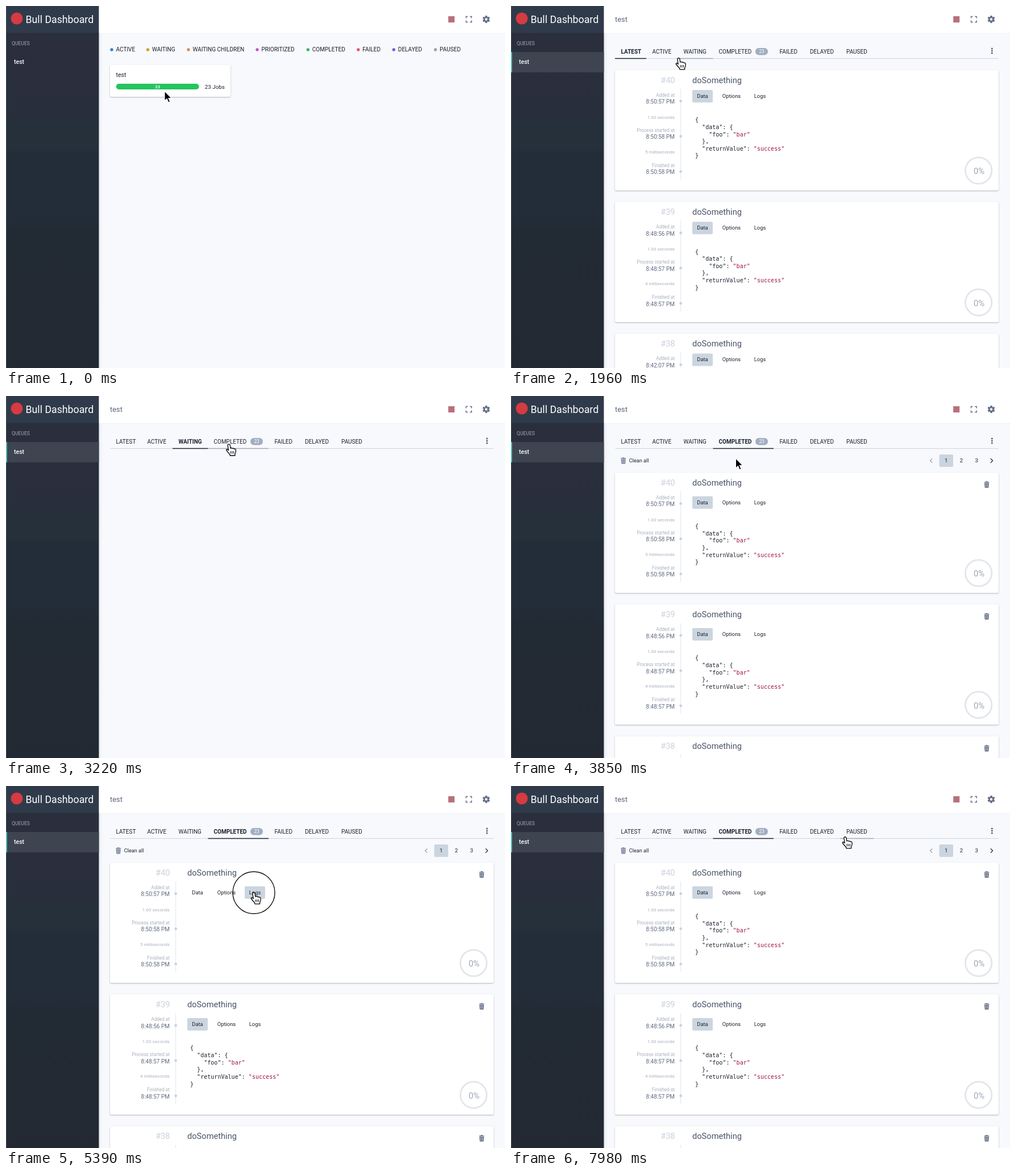
Animation, 878 px wide and 638 px high, one loop 8000 ms. Source, as an HTML page:

```html
<!DOCTYPE html>
<html lang="en">
<head>
<meta charset="utf-8">
<title>Queue dashboard</title>
<style>
  html, body { margin: 0; width: 100%; height: 100%; overflow: hidden; background: #f8f9fd; }
  svg { display: block; width: 878px; height: 638px; }
  text { font-family: Roboto, "Open Sans", sans-serif; fill: #1a202c; }
  .code { font-family: "DejaVu Sans Mono", monospace; font-size: 10.05px; }
  .card { fill: #fff; filter: drop-shadow(0 1px 1px rgba(0, 0, 0, .28)); }
  .hidden { display: none; }
</style>
</head>
<body>
<svg id="stage" viewBox="0 0 878 638" xmlns="http://www.w3.org/2000/svg"></svg>
<script>
const LOOP = 8000, STEP = 70;
const PILL = '#cbd5e0', MUTED = '#a9b0be', ICON = '#667188', CHAR = 6.05;

const text = (x, y, size, str, attrs = '') =>
  `<text x="${x}" y="${y}" font-size="${size}" ${attrs}>${str}</text>`;
const rect = (x, y, w, h, fill, attrs = '') =>
  `<rect x="${x}" y="${y}" width="${w}" height="${h}" fill="${fill}" ${attrs}/>`;
const dot = (x, y, r, fill) => `<circle cx="${x}" cy="${y}" r="${r}" fill="${fill}"/>`;
const line = (d, color, width = 1) =>
  `<path d="${d}" fill="none" stroke="${color}" stroke-width="${width}"/>`;
const group = (id, body, attrs = '') => `<g id="${id}" ${attrs}>${body}</g>`;

// label, left edge, right edge, text position
const TABS = [
  ['LATEST', 183, 238, 193.5], ['ACTIVE', 238, 293, 248.5], ['WAITING', 293, 355.5, 303.5],
  ['COMPLETED', 355.5, 462, 365.5], ['FAILED', 462, 515.5, 472.5],
  ['DELAYED', 515.5, 579.5, 526], ['PAUSED', 579.5, 638, 590]
];
const BUTTONS = [['Data', 319, 36], ['Options', 363, 50], ['Logs', 420, 36]];
const LEGEND = [
  ['ACTIVE', 186, '#3182ce'], ['WAITING', 249.5, '#d69e2e'], ['WAITING CHILDREN', 321, '#dd8d55'],
  ['PRIORITIZED', 442, '#c453d2'], ['COMPLETED', 531.3, '#38b56f'], ['FAILED', 619.8, '#e25b6c'],
  ['DELAYED', 682.3, '#805ad5'], ['PAUSED', 755.6, '#a0a0a0']
];
const JOBS = [
  [40, '8:50:57 PM', '8:50:58 PM', 5],
  [39, '8:48:56 PM', '8:48:57 PM', 4],
  [38, '8:42:07 PM', '8:42:08 PM', 4]
];
// indent, key part, string part
const DATA = [[0, '{'], [2, '"data": {'], [4, '"foo": ', '"bar"'], [2, '},'],
  [2, '"returnValue": ', '"success"'], [0, '}']];
const OPTIONS = [[0, '{'], [2, '"attempts": 0,'], [2, '"delay": 1000'], [0, '}']];

function code(lines, top) {
  return lines.map(([indent, key, value], i) => {
    const x = 324 + indent * CHAR, y = top + i * 12.65;
    return text(x, y, 10.05, key, 'class="code"') + (value
      ? text(x + key.length * CHAR, y, 10.05, value, 'class="code" style="fill:#a1113f"') : '');
  }).join('');
}

function trash(x, y, color) {
  return line(`M${x - 4.5} ${y - 4}h9M${x - 1.7} ${y - 5.2}h3.4`, color, 1.3) +
    `<path d="M${x - 4} ${y - 2.6}h8l-.7 8.2h-6.6z" fill="${color}"/>` +
    line(`M${x - 1.4} ${y - 1.2}v5.3M${x + 1.4} ${y - 1.2}v5.3`, '#fff', .7);
}

function timeline(top, [, added, started, ms]) {
  const right = (y, size, str, color) =>
    text(288, top + y, size, str, `text-anchor="end" style="fill:${color}"`);
  const entry = (y, label, time) =>
    right(y, 8.2, label, MUTED) + right(y + 12.8, 10, time, '#606b80') + dot(298.7, top + y + 8.2, 2.4, '#cdd2db');
  return line(`M298.7 ${top + 33}v160`, '#e1e5eb') +
    entry(46.5, 'Added at', added) + right(85.5, 8.1, '1.00 seconds', MUTED) +
    entry(108.5, 'Process started at', started) + right(147, 8.1, ms + ' milliseconds', MUTED) +
    entry(170.5, 'Finished at', started);
}

// Finished jobs have a delete icon, which makes the row of buttons sit lower.
function card(job, i, top, finished) {
  const y = top + i * 232.3, shift = finished ? 6.8 : 0, live = finished && i === 0;
  const buttons = BUTTONS.map(([label, x, w], k) =>
    rect(x, y + 35 + shift, w, 22, PILL, `rx="2" ${live ? `id="button${k}"` : ''} class="${k ? 'hidden' : ''}"`) +
    text(x + w / 2, y + 48.8 + shift, 9.4, label, 'text-anchor="middle"')).join('');
  const codeTop = y + 91.2 + shift;
  return rect(183, y, 675, 212, '#fff', 'rx="2.5" class="card"') +
    text(288.5, y + 22.5, 14.5, '#' + job[0], 'text-anchor="end" style="fill:#cbd1db"') +
    text(319, y + 22.5, 14.65, 'doSomething', 'style="fill:#4a5568"') +
    timeline(y, job) + buttons +
    (live ? group('panel0', code(DATA, codeTop)) + group('panel1', code(OPTIONS, codeTop)) : code(DATA, codeTop)) +
    `<circle cx="822.7" cy="${y + 177}" r="23.2" fill="none" stroke="#e3e5eb" stroke-width="2.8"/>` +
    text(823.5, y + 183.2, 14.8, '0%', 'text-anchor="middle" style="fill:#9aa4b6"') +
    (finished ? trash(837, y + 21.2, ICON) : '');
}

const cards = (top, finished) => JOBS.map((job, i) => card(job, i, top, finished)).join('');

function sidebar() {
  return `<linearGradient id="side" x2="0" y2="1">
      <stop offset="0" stop-color="#2a2e3d"/><stop offset=".25" stop-color="#292e3d"/>
      <stop offset=".27" stop-color="#25303a"/><stop offset=".34" stop-color="#25303a"/>
      <stop offset=".36" stop-color="#232d3a"/><stop offset=".54" stop-color="#232d39"/>
      <stop offset=".6" stop-color="#222a34"/><stop offset="1" stop-color="#222933"/>
    </linearGradient>
    <linearGradient id="edge"><stop stop-color="#dcdfe5"/><stop offset=".35" stop-color="#eff1f5"/>
      <stop offset="1" stop-color="#f8f9fd"/></linearGradient>` +
    rect(163, 49, 7, 589, 'url(#edge)') + rect(0, 48, 163.4, 590, 'url(#side)') +
    rect(0, 0, 163.4, 48, '#2f3b4a') + rect(0, 47.5, 163.4, 1, '#28313e') +
    rect(0, 0, 1, 638, '#47505c') +
    group('item', rect(0, 81, 163.4, 36, '#3e4450') + rect(0, 81, 1.8, 36, '#4fd1c5')) +
    dot(19, 22, 10.5, '#d63a42') +
    text(34.5, 29.8, 17.75, 'Bull Dashboard', 'style="fill:#fff"') +
    text(10, 68.6, 8.6, 'QUEUES', 'style="fill:#a5abb5"') +
    text(14, 102.3, 10.5, 'test', 'font-weight="500" style="fill:#f7f9fb"');
}

function header() {
  const teeth = Array.from({ length: 6 }, (_, i) =>
    rect(843.2, 16.9, 3.6, 4, ICON, `rx=".7" transform="rotate(${i * 60} 845 23.5)"`)).join('');
  return rect(163, 0, 715, 48, '#fff') + rect(163, 48, 715, 1, '#edf0f4') +
    rect(778.2, 18, 11, 11, '#b8717b') +
    line('M809.5 21.6v-3h3M816.2 18.6h3v3M819.2 25.4v3h-3M812.5 28.4h-3v-3', ICON, 1.5) +
    teeth + `<circle cx="845" cy="23.5" r="3.5" fill="#fff" stroke="${ICON}" stroke-width="2.7"/>`;
}

function overview() {
  return LEGEND.map(([label, x, color]) => dot(x, 77, 2.7, color) + text(x + 7.5, 80, 10.05, label)).join('') +
    rect(183, 104, 212, 56, '#fff', 'rx="2.5" class="card"') +
    text(193.5, 125, 10.6, 'test') +
    rect(193.7, 137, 146, 10, '#22c55e', 'rx="5"') +
    text(266.7, 144.7, 8, '23', 'text-anchor="middle" font-weight="500" style="fill:#fff"') +
    text(349.7, 145.5, 9.9, '23 Jobs');
}

function queue() {
  return text(183, 27.5, 12.9, 'test', 'style="fill:#5a667c"') +
    line('M183.5 92.5H858', '#cfd4dc') +
    TABS.map(([label, left, right, x], i) =>
      text(x, 83.5, 10, label, `id="tab${i}"`) +
      line(`M${left} 92.5H${right}`, '#a3a9b4', 1.3).replace('<path', `<path id="under${i}"`)).join('') +
    rect(430, 74, 22, 12.5, '#a0aec0', 'rx="6.2"') +
    text(441, 83.3, 8.2, '23', 'text-anchor="middle" style="fill:#fff"') +
    [75, 79, 83].map(y => dot(846.3, y, 1.5, '#56606f')).join('');
}

function toolbar() {
  return trash(197.7, 114, '#77839a') + text(207.8, 117, 9.1, 'Clean all') +
    rect(753.5, 103, 24.5, 22, PILL, 'rx="2"') +
    ['1', '2', '3'].map((n, i) => text(765.8 + i * 26.7, 117.4, 9.6, n, 'text-anchor="middle"')).join('') +
    line('M741.3 110.3l-3.8 3.7 3.8 3.7', '#8a93a3', 1.1) +
    line('M843.8 110.3l3.8 3.7-3.8 3.7', '#2d3142', 1.3);
}

const cursor =
  '<path id="arrow" d="M0 0V17.2L4 13.5L6.8 20L9.7 18.8L7 12.5H12.4Z" fill="#000" stroke="#fff" stroke-width="1.2"/>' +
  group('hand', `<path d="M-2.2 1.6Q-2 -.4 0 -.4Q1.8 -.3 2 1.6L2.7 7Q4.6 5.4 6 7.4Q8.1 6.2 9.1 8.3
    Q11.6 7.4 12.1 10Q12.6 14 10.6 17V19.8H2L1.5 17.8Q-2 14 -4.6 10.5Q-5 8.4 -2.9 8.8L-.8 10.6Z"
    fill="#fff" stroke="#000" stroke-width="1.3" stroke-linejoin="round"/>` +
    line('M3.2 12v4.4M5.8 12v4.4M8.4 12v4.4', '#000', 1));

const stage = document.getElementById('stage');
stage.innerHTML = rect(0, 0, 878, 638, '#f8f9fd') + header() + sidebar() +
  group('overview', overview()) + group('queue', queue()) +
  group('latest', cards(113, false)) + group('completed', toolbar() + cards(135, true)) +
  '<circle id="ring" fill="none" stroke="#111" stroke-width="1.4"/>' + group('cursor', cursor);

const el = id => document.getElementById(id);
const show = (id, on) => el(id).classList.toggle('hidden', !on);

// time, open tab (-1 is the overview), open panel of the first job
const VIEWS = [[0, -1, 0], [1400, 0, 0], [2660, 2, 0], [3640, 3, 0], [4690, 3, 1], [5390, 3, 2], [6090, 3, 0]];
const PATH = [
  [0, 279, 150], [70, 279, 150], [840, 136, 134], [980, 129, 128], [1260, 72, 102], [1400, 74, 101],
  [1680, 196, 103], [1960, 295, 92], [2310, 321, 85], [2660, 322, 85], [3220, 392.3, 85.2], [3360, 397, 85],
  [3640, 397, 86], [4270, 391, 178], [4480, 393, 180], [4620, 398, 184], [5110, 434, 187], [5390, 436, 188],
  [5810, 343, 189], [6090, 342, 190], [6300, 356, 206], [6440, 357, 206], [6650, 357, 206],
  [7420, 594, 96], [7560, 597, 90], [7770, 597, 90], [7980, 588, 90], [LOOP, 588, 90]
];
const CLICKS = [[1260, 72, 102], [2450, 321, 85], [3500, 397, 86], [4480, 393, 180], [5250, 436, 188], [5950, 342, 189]];

function position(t) {
  const i = PATH.findIndex(p => p[0] > t);
  const [t0, x0, y0] = PATH[i - 1], [t1, x1, y1] = PATH[i];
  const k = (t - t0) / (t1 - t0), ease = k * k * (3 - 2 * k);
  return [x0 + (x1 - x0) * ease, y0 + (y1 - y0) * ease];
}

function draw(t) {
  const [x, y] = position(t);
  const [, tab, panel] = VIEWS.filter(v => v[0] <= t).pop();
  const inside = (left, right, top, bottom) => x >= left && x < right && y >= top && y < bottom;
  let pointing = inside(0, 163, 81, 117);

  show('overview', tab < 0);
  show('queue', tab >= 0);
  show('item', tab >= 0);
  show('latest', tab === 0);
  show('completed', tab === 3);

  TABS.forEach(([, left, right], i) => {
    const hover = tab >= 0 && inside(left, right, 66, 94), active = i === tab;
    pointing ||= hover;
    el('tab' + i).setAttribute('font-weight', active ? 700 : 400);
    el('under' + i).setAttribute('stroke', active ? '#20242e' : '#a3a9b4');
    show('under' + i, active || hover);
  });
  BUTTONS.forEach(([, left, width], i) => {
    const hover = tab === 3 && inside(left, left + width, 177, 199);
    pointing ||= hover;
    show('button' + i, hover || i === panel);
  });
  show('panel0', panel === 0);
  show('panel1', panel === 1);

  show('arrow', !pointing);
  show('hand', pointing);
  el('cursor').setAttribute('transform', `translate(${x.toFixed(1)} ${y.toFixed(1)})`);

  const click = CLICKS.find(c => t >= c[0] && t < c[0] + 210);
  show('ring', click);
  if (click) {
    const age = (t - click[0]) / 210, ring = el('ring');
    ring.setAttribute('cx', click[1]);
    ring.setAttribute('cy', click[2]);
    ring.setAttribute('r', 12 + 37.5 * age);
  }
}

const start = performance.now();
function tick() {
  const t = (performance.now() - start) % LOOP;
  draw(Math.floor(t / STEP) * STEP);
  requestAnimationFrame(tick);
}
tick();
</script>
</body>
</html>
```
